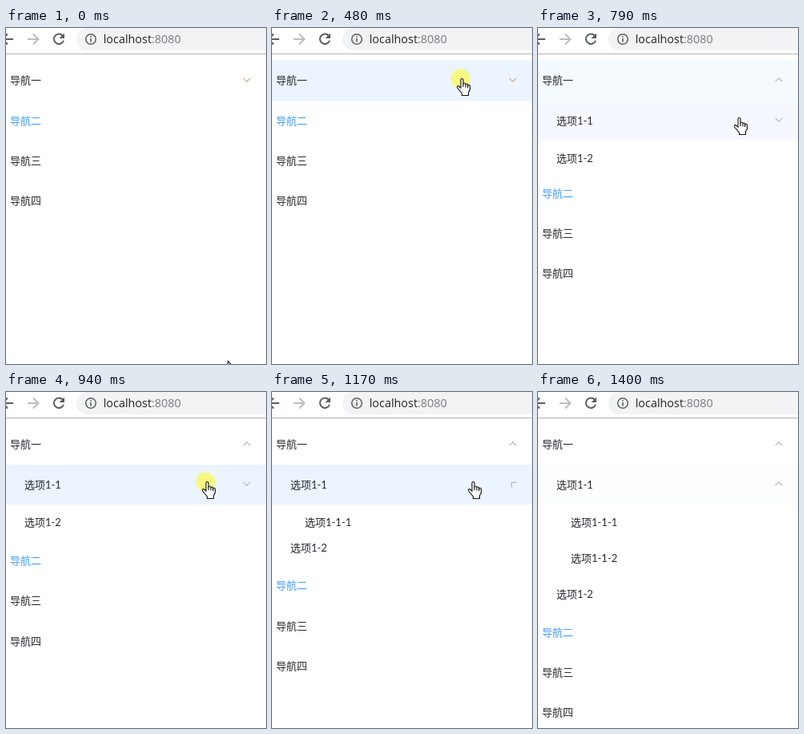
Write an HTML page with a canvas that moves like this. It is 325 px wide and 421 px high and loops after 1860 ms.

```html
<!DOCTYPE html>
<html lang="zh">
<head>
<meta charset="utf-8">
<title>导航</title>
<style>
html, body { margin: 0; width: 100%; height: 100%; overflow: hidden; background: #fff; }
canvas { display: block; }
</style>
</head>
<body>
<canvas id="stage" width="325" height="421"></canvas>
<script>
const ctx = document.getElementById('stage').getContext('2d');
const LOOP = 1860;
const STEPS = [0, 70, 150, 240, 330, 400, 480, 560, 630, 710, 790, 860, 940, 1070, 1170, 1250, 1320, 1400];
const TOP = 40.4, TITLE = 50.4, ITEM = 45;
const MENU_FONT = '13px Lato, "Noto Sans CJK SC", "Noto Sans CJK", sans-serif';
const URL_FONT = '14.4px "Open Sans", "Noto Sans", sans-serif';

// Hand positions are the top-left corner of the pointer, the arrow's is its tip.
const POINTER = [
  [0, 277, 417, 'arrow'], [70, 272, 300, 'arrow'], [150, 249, 180, 'hand'],
  [240, 236, 84, 'hand'], [330, 231, 63, 'hand'], [630, 235, 77, 'hand'],
  [710, 243, 104, 'hand'], [790, 245, 112, 'hand'], [1250, 299, 313, 'hand'],
  [1320, 0, 0, 'none']
];
const HAND = new Path2D('M5 12V2Q5 .5 6.5 .5T8 2V7.5Q8 6 9.5 6T11 8Q11 7 12.3 7T13.8 9Q14 8 15.2 8.3T16.5 10V14L14.5 18V21.5H6.5V19L1 12.5Q0 10.5 1 9.8T3.3 10.5Z');
const KNUCKLES = new Path2D('M8 7V11M11 8V11.5M13.8 9V12');
const ARROW = new Path2D('M.5 .5V16L4 12.5L6.5 18L9 17L6.5 11.5H11.5Z');

function bezier(x1, y1, x2, y2) {
  const axis = (a, b, s) => 3 * a * s * (1 - s) ** 2 + 3 * b * s * s * (1 - s) + s ** 3;
  return x => {
    if (x <= 0) return 0;
    if (x >= 1) return 1;
    let low = 0, high = 1;
    for (let i = 0; i < 24; i++) {
      const mid = (low + high) / 2;
      if (axis(x1, x2, mid) < x) low = mid; else high = mid;
    }
    return axis(y1, y2, low);
  };
}
const ease = bezier(.25, .1, .25, 1);
const easeInOut = bezier(.42, 0, .58, 1);
const fade = (t, start, duration = 300) => ease((t - start) / duration);

function stroke(path, color, width) {
  ctx.strokeStyle = color;
  ctx.lineWidth = width;
  ctx.stroke(new Path2D(path));
}

function text(label, x, y, color, font = MENU_FONT) {
  ctx.font = font;
  ctx.fillStyle = color;
  ctx.fillText(label, x, y);
}

function dot(x, y, r, color) {
  ctx.fillStyle = color;
  ctx.beginPath();
  ctx.arc(x, y, r, 0, 2 * Math.PI);
  ctx.fill();
}

function clipped(top, height, draw) {
  ctx.save();
  ctx.beginPath();
  ctx.rect(0, Math.round(top), 325, Math.round(top + height) - Math.round(top));
  ctx.clip();
  draw();
  ctx.restore();
}

function row(label, top, height, level = 0, color = '#26282b') {
  text(label, 5 + 18 * level, Math.floor(top + height / 2) + 5, color);
}

function highlight(top, bottom, amount) {
  ctx.globalAlpha = amount;
  ctx.fillStyle = '#ebf4ff';
  ctx.fillRect(0, top, 325, bottom - top);
  ctx.globalAlpha = 1;
}

function chevron(y, turn, color = '#b0b4b9') {
  ctx.save();
  ctx.translate(301, y);
  ctx.rotate(turn * Math.PI);
  stroke('M-4.3 -2.1L0 2.2L4.3 -2.1', color, 1.1);
  ctx.restore();
}

function toolbar() {
  ctx.fillStyle = '#f1f3f4';
  ctx.beginPath();
  ctx.roundRect(88, 0, 300, 28, 14);
  ctx.fill();
  ctx.fillStyle = '#b5b4b0';
  ctx.fillRect(0, 32, 325, 1);
  stroke('M9 14H-4M2 7.5L-4.5 14L2 20.5', '#5a5d61', 2);
  stroke('M27 14H40M34 7.5L40.5 14L34 20.5', '#bbbdc0', 2);
  stroke('M70.8 9.6A6.2 6.2 0 1 0 72 15.7', '#5a5d61', 2);
  ctx.fillStyle = '#5a5d61';
  ctx.fill(new Path2D('M73 6.5V13H66.5Z'));
  stroke('M99.7 14a6.3 6.3 0 1 0 12.6 0a6.3 6.3 0 1 0 -12.6 0', '#5a5d61', 1.5);
  stroke('M106 13V17.5M106 10.3V11.8', '#5a5d61', 1.6);
  text('localhost', 121.7, 19, '#222428', URL_FONT);
  text(':8080', 182, 19, '#777a7e', URL_FONT);
}

function menu(t) {
  const subOpen = easeInOut((t - 522) / 315);
  const nestedOpen = easeInOut((t - 997) / 420);
  const nested = 2 * ITEM * nestedOpen;
  const subHeight = (TITLE + ITEM) * subOpen + nested;
  const subTop = TOP + TITLE;
  const nestedTop = subTop + TITLE;
  const turn = fade(t, 522);

  highlight(40, 91, fade(t, 220) * (1 - fade(t, 700)));
  row('导航一', TOP, TITLE);
  chevron(65, turn, turn ? undefined : '#d3a37f');

  clipped(subTop, subHeight, () => {
    highlight(91, 141, fade(t, 700) * (1 - fade(t, 1210)));
    row('选项1-1', subTop, TITLE, 1);
    chevron(115, fade(t, 997, 400));
    clipped(nestedTop, nested, () => {
      highlight(141, 186, Math.max(0, fade(t, 1222) - fade(t, 1290, 110)));
      row('选项1-1-1', nestedTop, ITEM, 2);
      row('选项1-1-2', nestedTop + ITEM, ITEM, 2);
    });
    row('选项1-2', nestedTop + nested, ITEM, 1);
  });

  ['导航二', '导航三', '导航四'].forEach((label, i) =>
    row(label, subTop + subHeight + i * TITLE, TITLE, 0, i ? undefined : '#409eff'));
}

function pointer(t) {
  const [, x, y, kind] = POINTER.findLast(p => p[0] <= t);
  if (kind === 'none') return;
  const pressed = (t >= 480 && t < 560) || (t >= 940 && t < 1070);
  if (pressed) dot(x + 4.5, y + .5, 12, '#f7f782');
  ctx.save();
  ctx.translate(x, y);
  const shape = kind === 'hand' ? HAND : ARROW;
  ctx.fillStyle = '#fff';
  ctx.strokeStyle = '#111';
  ctx.lineWidth = 1.1;
  ctx.fill(shape);
  ctx.stroke(shape);
  if (kind === 'hand') ctx.stroke(KNUCKLES);
  ctx.restore();
}

function draw(now) {
  const time = now % LOOP;
  const t = STEPS.findLast(step => step <= time);
  ctx.fillStyle = '#fff';
  ctx.fillRect(0, 0, 325, 421);
  toolbar();
  menu(t);
  pointer(t);
}

let start;
function tick(now) {
  start ??= now;
  draw(Math.max(0, now - start));
  requestAnimationFrame(tick);
}
requestAnimationFrame(tick);
</script>
</body>
</html>
```
